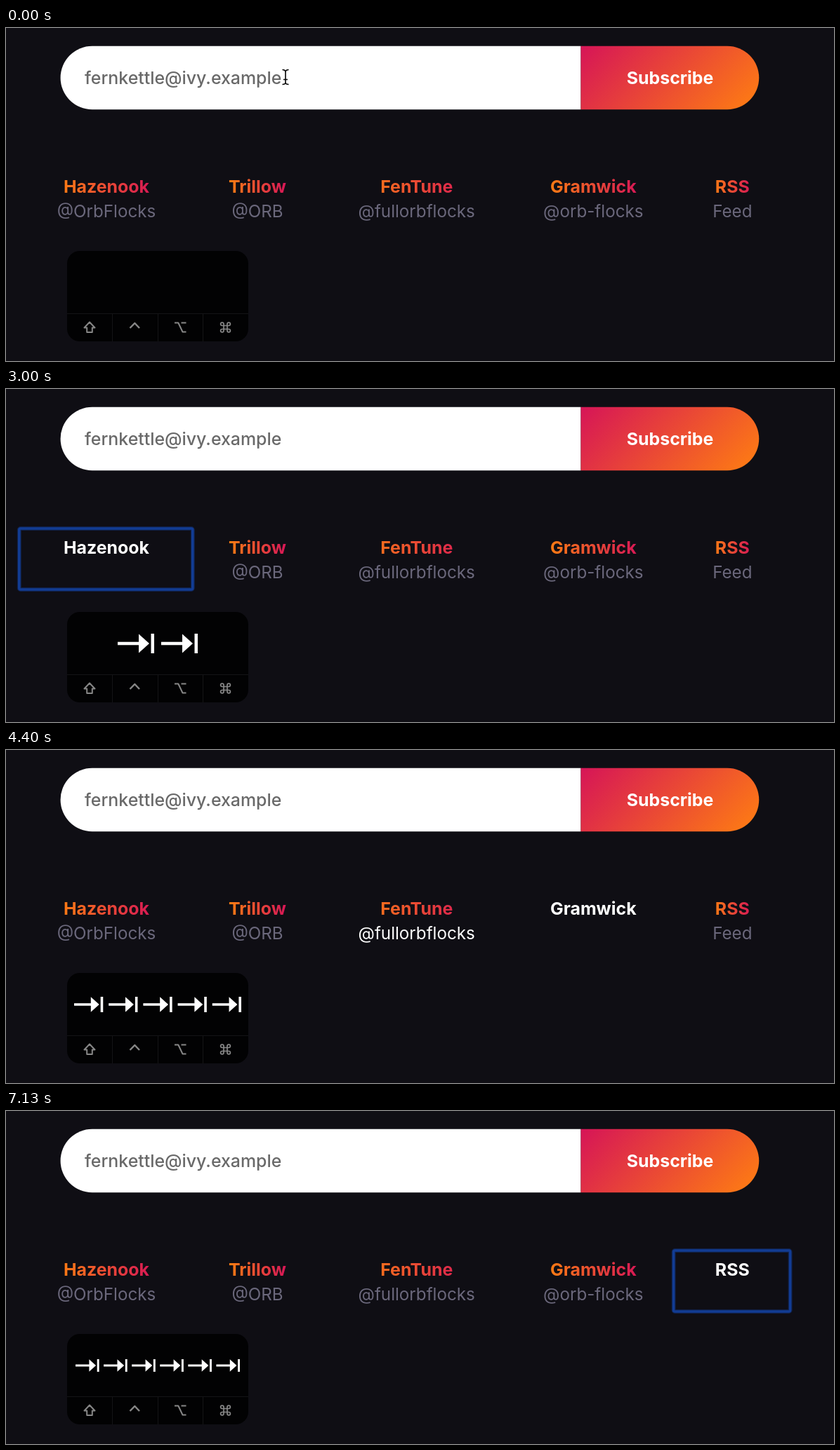
Animation of 1179x475 px, one loop 7190 ms. Source, as an HTML page:

```html
<!DOCTYPE html>
<html lang="en">
<head>
<meta charset="utf-8">
<title>Tabbing through links</title>
<style>
  html, body { margin: 0; width: 100%; height: 100%; overflow: hidden; background: #0f0e14; }
  svg { display: block; width: 100vw; height: 100vh; font-family: Inter, "Noto Sans", sans-serif; }
  .title { font-size: 24.9px; font-weight: 700; text-anchor: middle; }
  .handle { font-size: 24.2px; text-anchor: middle; }
  .line { fill: none; stroke: #878787; stroke-width: 2; stroke-linejoin: round; }
</style>
</head>
<body>
<svg viewBox="0 0 1179 475" xmlns="http://www.w3.org/2000/svg">
  <defs id="defs">
    <linearGradient id="button" gradientUnits="userSpaceOnUse" x1="859.75" y1="-14.75" x2="1031.25" y2="156.75">
      <stop stop-color="#d61557"/><stop offset="1" stop-color="#ff7f11"/>
    </linearGradient>
    <path id="tab" d="M0 -2.3H30V-13.5L45 0L30 13.5V2.3H0ZM47.5 -14H52V14H47.5Z"/>
  </defs>
  <rect width="1179" height="475" fill="#0f0e14"/>

  <path d="M818.5 25.7H122.8a45.25 45.25 0 0 0 0 90.5H818.5Z" fill="#fff"/>
  <path d="M818.5 25.7H1027a45.25 45.25 0 0 1 0 90.5H818.5Z" fill="url(#button)"/>
  <text x="112" y="80" font-size="24.9" font-weight="500" fill="#696969">fernkettle@ivy.example</text>
  <text class="title" x="945.5" y="80" fill="#fff">Subscribe</text>
  <rect id="caret" x="113.3" y="55.5" width="1.6" height="29.5" fill="#000"/>

  <g id="links"></g>

  <rect x="87" y="318" width="258" height="129" rx="18" fill="#020203"/>
  <path d="M87 407.5H345M151.5 408V447M216.5 408V447M280.5 408V447" stroke="#141416" fill="none"/>
  <g class="line">
    <path d="M119 419.5L111.5 427.5H115.2V434H122.8V427.5H126.5Z"/>
    <path d="M176.5 428L183.3 421L190 428" stroke-width="2.5"/>
    <path d="M240 420.5H245.3L251.5 433.5H256.5M249.5 420.5H256.5"/>
    <path d="M310 424.5H315V429.5H310ZM310 424.5H307.8a2.2 2.2 0 1 1 2.2 -2.2ZM315 424.5V422.3a2.2 2.2 0 1 1 2.2 2.2ZM315 429.5H317.2a2.2 2.2 0 1 1 -2.2 2.2ZM310 429.5V431.7a2.2 2.2 0 1 1 -2.2 -2.2Z" stroke-width="1.7"/>
  </g>
  <g id="keys" fill="#fff"></g>

  <g id="cursor">
    <path id="beam" d="M-4.5 -10.5Q0 -10.5 0 -7V7.5Q0 10.5 -4.5 10.5M4.5 -10.5Q0 -10.5 0 -7V7.5Q0 10.5 4.5 10.5M-3 3.5H3" fill="none" stroke="#000" stroke-width="1.6"/>
    <path id="arrow" d="M0 0V19L4.5 15L7.5 22L10.5 20.7L7.5 14H13.5Z" fill="#000" stroke="#fff" stroke-width="1.3"/>
  </g>
</svg>
<script>
const LOOP = 7190;
const NS = "http://www.w3.org/2000/svg";
const $ = id => document.getElementById(id);
const clamp = v => Math.max(0, Math.min(1, v));
const show = (node, on) => node.setAttribute("visibility", on ? "visible" : "hidden");

function add(parent, tag, attrs, text) {
  const node = document.createElementNS(NS, tag);
  for (const k in attrs) node.setAttribute(k, attrs[k]);
  if (text) node.textContent = text;
  parent.appendChild(node);
  return node;
}

// title, handle, centre, focus ring width, time of focus
const links = [
  ["Hazenook", "@OrbFlocks", 143, 251, 2730],
  ["Trillow", "@ORB", 358, 197, 3470],
  ["FenTune", "@fullorbflocks", 584.7, 276, 3930],
  ["Gramwick", "@orb-flocks", 836.3, 247, 4400],
  ["RSS", "Feed", 1034.3, 170, 4800]
].map(([title, handle, cx, w, start], i, all) => {
  const half = (w - 114) / 2;
  const grad = add($("defs"), "linearGradient", {
    id: "g" + i, gradientUnits: "userSpaceOnUse", x1: cx - half, x2: cx + half, y1: 0, y2: 0
  });
  add(grad, "stop", { offset: 0, "stop-color": "#ff7f11" });
  add(grad, "stop", { offset: 1, "stop-color": "#d61557" });
  const box = { x: cx - w / 2 + 1.3, y: 199, width: w - 4, height: 87, rx: 2, fill: "none", stroke: "#123c94" };
  const g = $("links");
  return {
    start,
    end: i < all.length - 1 ? all[i + 1][4] : Infinity,
    paint: `url(#g${i})`,
    glow: add(g, "rect", { ...box, "stroke-width": 6 }),
    ring: add(g, "rect", { ...box, "stroke-width": 3.6 }),
    title: add(g, "text", { class: "title", x: cx, y: 235 }, title),
    handle: add(g, "text", { class: "handle", x: cx, y: 270 }, handle)
  };
});

const presses = [1870, ...links.map(l => l.start)];
const arrows = presses.map(() => add($("keys"), "use", { href: "#tab" }));

const GREY = [107, 104, 124];
const fadeToGrey = p => `rgb(${GREY.map(c => Math.round(255 + (c - 255) * p))})`;

function drawLink(l, t) {
  const focused = t >= l.start && t < l.end;
  const age = t - l.start;
  l.title.setAttribute("fill", focused ? "#fff" : l.paint);
  show(l.handle, !focused);
  l.handle.setAttribute("fill", fadeToGrey(t < l.end ? 1 : clamp((t - l.end) / 200)));
  l.ring.setAttribute("opacity", focused ? clamp((age - 70) / 120) : 0);
  l.glow.setAttribute("opacity", focused ? 0.4 * clamp((age - 200) / 70) : 0);
}

// Arrows stay centred and shrink once they outgrow the panel.
function drawKeys(t) {
  const n = presses.filter(p => t >= p).length;
  const full = n * 62 - 10;
  const s = Math.min(1, (n > 5 ? 234 : 238) / full);
  arrows.forEach((a, i) => {
    show(a, i < n);
    a.setAttribute("transform", `translate(${216 - full * s / 2 + i * 62 * s} 363) scale(${s})`);
  });
}

function drawCursor(t) {
  const p = clamp((t - 200) / 200);
  const y = 70 - 65 * p * p;
  const visible = t < 470;
  $("cursor").setAttribute("transform", `translate(398 ${y})`);
  show($("beam"), visible && y >= 26);
  show($("arrow"), visible && y < 26);
}

function draw(t) {
  show($("caret"), (t >= 200 && t < 670) || (t >= 1200 && t < 1670));
  links.forEach(l => drawLink(l, t));
  drawKeys(t);
  drawCursor(t);
}

const begin = performance.now();
function tick() {
  draw((performance.now() - begin) % LOOP);
  requestAnimationFrame(tick);
}
tick();
</script>
</body>
</html>
```
